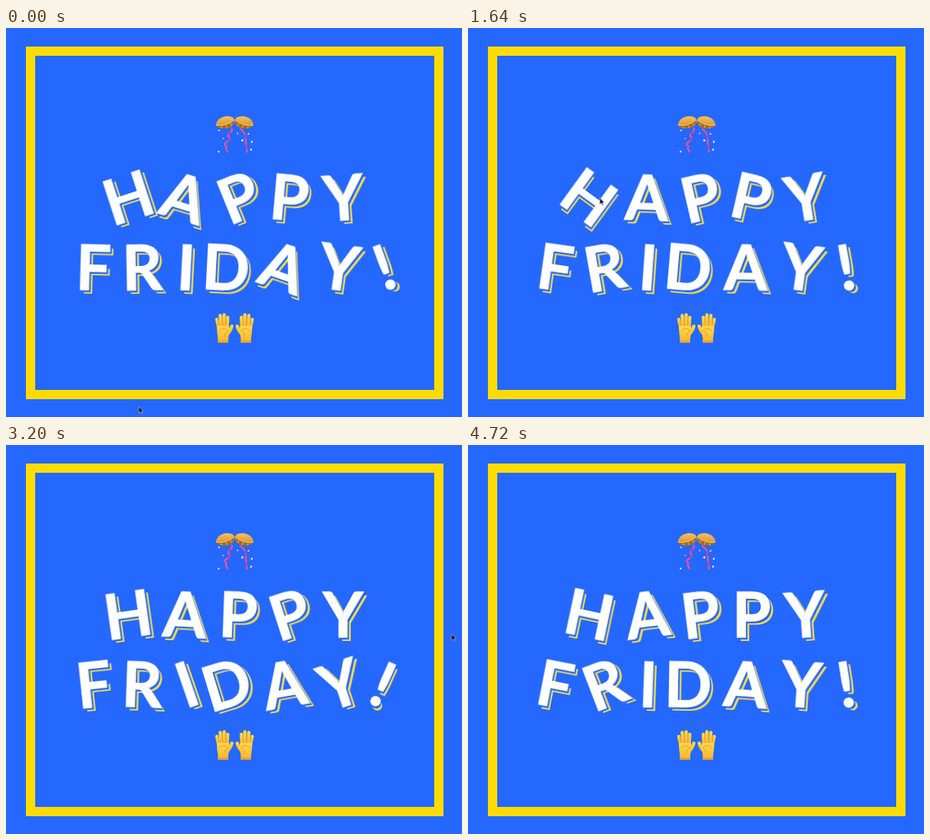
These frames come from a looping animation (640 by 546 pixels, 4.76 s). An HTML page:

```html
<!DOCTYPE html>
<html lang="en">
<head>
<meta charset="utf-8">
<title>Happy Friday</title>
<style>
  html, body { margin: 0; width: 100%; height: 100%; overflow: hidden; background: #2468ff; }
  #stage { position: absolute; left: 0; top: 0; width: 640px; height: 546px; overflow: hidden; }
  #frame { position: absolute; left: 28px; top: 26px; width: 560px; height: 469px; border: 13px solid #ffdc00; }
  #art { position: absolute; left: 0; top: 0; }
  .letter {
    position: absolute; width: 100px; height: 100px;
    font: 700 88px/100px Lato, sans-serif; text-align: center; color: #fff;
    -webkit-text-stroke: 1px #fff;
    text-shadow: 2.6px 2.6px 0 #2468ff, 5px 5px 0 #fbdc48;
  }
  #cursor { position: absolute; left: 0; top: 0; }
</style>
</head>
<body>
<div id="stage">
  <div id="frame"></div>
  <svg id="art" width="640" height="546" viewBox="0 0 640 546">
    <defs>
      <linearGradient id="gold" x1="0" y1="0" x2="0" y2="1">
        <stop offset="0" stop-color="#f6c05c"/><stop offset="1" stop-color="#d08a28"/>
      </linearGradient>
      <linearGradient id="skin" x1="0" y1="0" x2="0" y2="1">
        <stop offset="0" stop-color="#ffd84a"/><stop offset="1" stop-color="#f9b52c"/>
      </linearGradient>
      <g id="bowl">
        <path d="M294.5 136C296 126 309 120.500 319 126L321 130C320 137 315 140.500 308 141C302 141 297 140 294.500 136Z" fill="url(#gold)"/>
        <path d="M294.500 136C302 138 313 135 320.500 128.500C320.500 136 315 140.500 308 141C302 141 297 140 294.500 136Z" fill="#a9691f"/>
        <path d="M295 136.300C303 138 313 135 320.300 129" fill="none" stroke="#ffdb8a" stroke-width="1"/>
        <path d="M302 138L303 141M309 136.500L310.500 140M315 133.500L316.500 137" stroke="#e8ad4c" stroke-width="1.200"/>
      </g>
      <g id="hand">
        <path d="M297 441V432C294.500 427 293.500 421 293.500 416" fill="none"/>
        <g fill="none" stroke="url(#skin)" stroke-linecap="round" stroke-width="4.600">
          <path d="M298.500 421L295.900 409"/>
          <path d="M302 420L300.600 403.500"/>
          <path d="M306.500 420L306.200 402.500"/>
          <path d="M310.500 421L311.200 406"/>
          <path d="M311 429C314.500 426 316 422 317 418.500"/>
        </g>
        <path d="M296.200 418H312.800L314 424C313.500 430 311.500 432 312 441.500H297.500C298 433 295.500 428 296.200 418Z" fill="url(#skin)"/>
        <path d="M298.400 417.500L297.500 409M303.700 417L303.300 405M308.700 417.500L308.900 405M299 425C303 421 308 421 311 424M307 433C307 428 309 425.500 312 425" fill="none" stroke="#e3952a" stroke-width=".9" stroke-linecap="round"/>
        <path d="M297.600 438.500H312V441.500H297.500Z" fill="#f0a42b"/>
      </g>
    </defs>
    <g fill="none" stroke-linecap="round">
      <path d="M317 141C319 148 310 147 312 152C317 155 312 159 308 161C304 165 312 165 308.500 168C308 171 310 171 311 173.500" stroke="#e9539b" stroke-width="2.400"/>
      <path d="M329 142C336 146 337 152 336.500 158C336 164 339 168 338 174" stroke="#e9539b" stroke-width="2.400"/>
      <path d="M315.500 147L313 149M314 155L312 158M336 150L337 155M337.500 165L338 169" stroke="#b43ab0" stroke-width="2"/>
    </g>
    <use href="#bowl"/>
    <use href="#bowl" transform="translate(642 0) scale(-1 1)"/>
    <g fill="#f4e9f2">
      <path d="M298.500 142.500l2 1-1 1.500-2-1zM331 156l2.500 1-1.500 2.500-2-1zM344.500 158l2 1-1 2.500-2-1zM298 172l2 1-1 2-2-1zM343.500 169l2 1-1 2.500-2-1zM340 147l2 2-3 1z"/>
      <circle cx="325" cy="148" r="1.200" fill="#ffb4d8"/>
      <circle cx="305" cy="155" r="1" fill="#ffb4d8"/>
    </g>
    <use href="#hand"/>
    <use href="#hand" transform="translate(641.500 0) scale(-1 1)"/>
    <path d="M304 392L307 396M314 389.500L315.500 393M326 389.500L324.500 393M337.500 392L334.500 396" stroke="#4b69a8" stroke-width="1.800" stroke-linecap="round"/>
  </svg>
  <svg id="cursor" width="12" height="16" viewBox="0 0 12 16">
    <path d="M.8.5V9.500L2.900 7.600L4.300 10.800L5.700 10.200L4.300 7.100H7Z" fill="#05070f" stroke="#cfd8f4" stroke-width=".6"/>
  </svg>
</div>
<script>
const LOOP = 4760;
const TIMES = [0, 920, 1640, 2120, 3200, 3920, 4720];
const ROW1 = 235.5, ROW2 = 334;

// glyph, centre x, row, angles at TIMES, extra swings {ms: angle}
const LETTERS = [
  ['H', 171.5, ROW1, [-18, -4, 36, 5, -8, -11, 12], {1440: 0, 1840: -12, 2400: -3}],
  ['A', 251, ROW1, [17, 10, 2, 24, 3, 9, -7], {1840: -18, 2400: -8}],
  ['P', 328.5, ROW1, [-22, -7, -13, -42, 2, 3, -7], {1920: 0, 2400: 16, 2720: -6}],
  ['P', 400.5, ROW1, [5, 1, 13, -19, -18, -16, 0], {2280: -30, 2600: 8}],
  ['Y', 473, ROW1, [-4, -13, -9, 11, 0, 0, -4], {2360: 26, 2680: -10}],
  ['F', 125.5, ROW2, [1.5, 2, 8, -7, -6, -1, 11], {2840: 8}],
  ['R', 194.5, ROW2, [-1, -8, -10, 9, 2, 4, -21], {2880: -10, 4360: 4}],
  ['I', 252.5, ROW2, [3, 0, 4, -10, -19, 0, 2], {2920: 10}],
  ['D', 311.5, ROW2, [3, 7, 5, -6, -17, -3, 1], {2960: 8}],
  ['A', 390, ROW2, [19, 4, 1, -3, -10, 6, 4], {3000: 6}],
  ['Y', 468, ROW2, [8, 10, 8, -8, -18, -8, 4], {}],
  ['!', 530, ROW2, [-20, -1, -10, 14, 24, 8, -9], {}]
];

// pointer path: ms, x, y
const PATH = [
  [0, 186, 531], [320, 60, 512], [560, -4, 400], [920, 9, 270], [1120, 28, 268],
  [1400, 100, 252], [1640, 184, 238], [1880, 255, 240], [2120, 338, 236],
  [2360, 480, 240], [2520, 560, 290], [2800, 105, 335], [3080, 540, 330],
  [3200, 624, 265], [3280, 660, 250], [4000, 660, 500], [4040, 606, 510],
  [4200, 330, 420], [4360, 150, 320], [4440, 60, 200], [4480, -40, 150]
];

const stage = document.getElementById('stage');
const cursor = document.getElementById('cursor');
const pen = document.createElement('canvas').getContext('2d');
pen.font = '700 88px Lato, sans-serif';

function play(el, keys, easing) {
  const frames = keys.map(([ms, transform]) => ({offset: ms / LOOP, transform, easing}));
  frames.push({offset: 1, transform: keys[keys.length - 1][1]});
  const anim = el.animate(frames, {duration: LOOP, iterations: Infinity});
  anim.startTime = document.timeline.currentTime;
}

// distance from the advance centre to the ink centre
function inkShift(glyph) {
  const m = pen.measureText(glyph);
  return (m.actualBoundingBoxRight - m.actualBoundingBoxLeft - m.width) / 2;
}

for (const [glyph, x, y, angles, swings] of LETTERS) {
  const el = document.createElement('span');
  el.className = 'letter';
  el.textContent = glyph;
  el.style.left = x - 50 - inkShift(glyph) + 'px';
  el.style.top = y - 50 + 'px';
  stage.insertBefore(el, cursor);
  const keys = TIMES.map((ms, i) => [ms, angles[i]])
    .concat(Object.entries(swings).map(([ms, a]) => [+ms, a]))
    .sort((a, b) => a[0] - b[0])
    .map(([ms, a]) => [ms, `rotate(${a}deg)`]);
  play(el, keys, 'ease-in-out');
}

play(cursor, PATH.map(([ms, x, y]) => [ms, `translate(${x}px, ${y}px)`]), 'linear');
</script>
</body>
</html>
```
